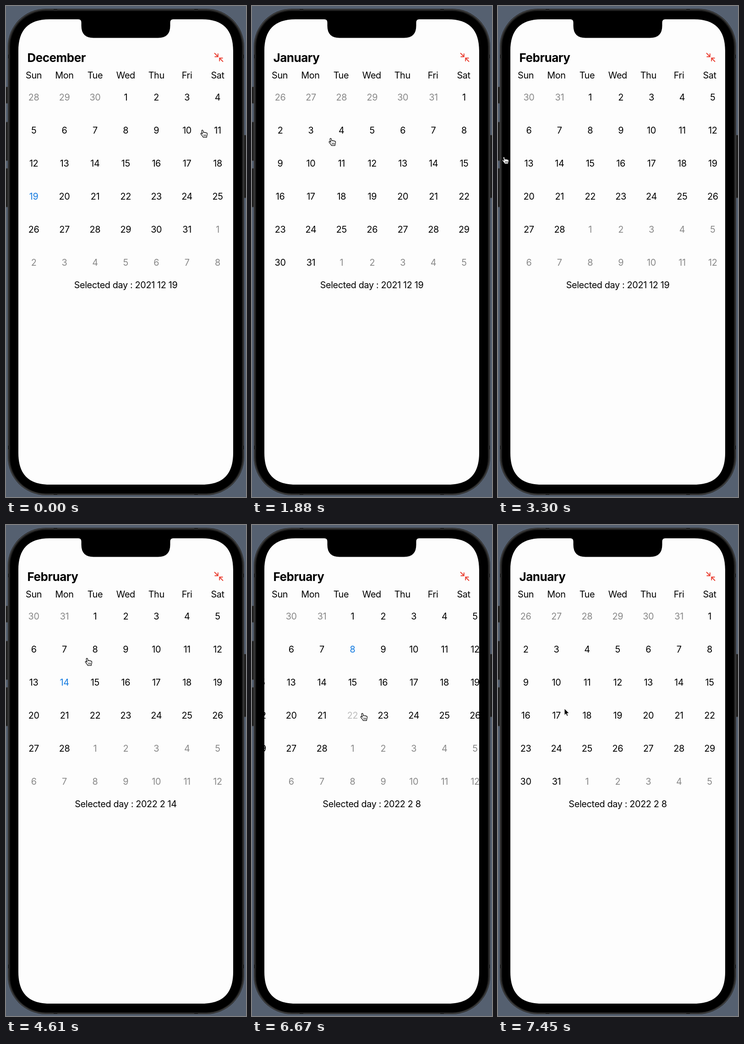
An HTML page for the animation above (7.51 s loop, 524x1070 px).

```html
<!DOCTYPE html>
<html lang="en">
<head>
<meta charset="utf-8">
<title>Calendar</title>
<style>
html, body { margin: 0; width: 100%; height: 100%; overflow: hidden; background: #556070; }
svg { display: block; width: 524px; height: 1070px; font-family: Inter, sans-serif; }
.body { font-size: 19.8px; letter-spacing: -0.35px; text-anchor: middle; }
.title { font-size: 26px; font-weight: 700; letter-spacing: -0.5px; }
</style>
</head>
<body>
<svg id="stage" viewBox="0 0 524 1070">
  <defs>
    <clipPath id="view"><rect x="27" y="170" width="469" height="420"/></clipPath>
  </defs>
  <rect width="524" height="1070" fill="#556070"/>
  <g fill="#1d1d1d" stroke="#3a3a3a">
    <path d="M-2 176.5H3.5V212H-2ZM-2 253H3.5V337H-2ZM-2 354H3.5V438H-2ZM526 281.500H520V418H526Z"/>
  </g>
  <rect x="4" y="6" width="516" height="1060" rx="83" fill="#1c1c1c"/>
  <rect x="5.500" y="7.500" width="513" height="1057" rx="81.500" fill="none" stroke="#464646" stroke-width="1.500"/>
  <path d="M104 6h8v5h-8zM411 6h8v5h-8zM104 1061h8v5h-8zM411 1061h8v5h-8zM4 106h5v8h-5zM515 106h5v8h-5zM4 958h5v8h-5zM515 958h5v8h-5z" fill="#222"/>
  <rect x="9" y="11" width="506" height="1051" rx="78"/>
  <path fill="#fdfdfd" d="M95 29H158Q164.500 29 164.500 36V43Q164.500 69.500 191 69.500H332Q358.500 69.500 358.500 43V36Q358.500 29 365 29H428C474 29 496 52 496 98V974C496 1020 474 1043 428 1043H95C49 1043 27 1020 27 974V98C27 52 49 29 95 29Z"/>
  <text id="month" class="title" x="46.500" y="121.500"></text>
  <path d="M455 102.500L462.500 110M462.800 103.500V110.500H455.500M474 121.500L466.500 114M466.200 120.500V113.500H473.500" fill="none" stroke="#ea3f32" stroke-width="1.900"/>
  <g id="week" class="body"></g>
  <g clip-path="url(#view)"><g id="pages" class="body"></g></g>
  <text id="chosen" class="body" x="261.500" y="615"></text>
  <g id="hand" stroke="#000" stroke-linejoin="round" stroke-linecap="round">
    <path fill="#fff" stroke-width="1.100" d="M-4.400 -6q0-1.600 1.300-1.800q1.300 0 1.600 1.600l.7 3.600q.4-1 1.400-1q1.200 0 1.500 1.100q.4-.7 1.300-.6q1.100.1 1.300 1.200q.4-.4 1.100-.2q1 .3 1 1.600q.1 2.500-.9 4.600l-.3 2.400h-7q-.4-1.600-1.800-2.900l-2.600-3.200q-.9-1.200 0-2q1-.7 2.300.8l.7.8Z"/>
    <path fill="none" stroke-width=".8" d="M0 1.200v3M2 1.200v3M4 1.200v3"/>
  </g>
  <path id="arrow" d="M0 0V14.500L3.300 11.400L5.600 16.500L8 15.500L5.800 10.500H10.300Z" stroke="#fff" stroke-width="1"/>
</svg>
<script>
const LOOP = 7510, PAGE = 468, COL = 66.9, ROW = 72, LEFT = 60.6;
const NS = "http://www.w3.org/2000/svg";
const el = id => document.getElementById(id);
const clamp = v => Math.max(0, Math.min(1, v));
const smooth = p => p * p * (3 - 2 * p);

// Cursor stops: time, x, y, optional power for an accelerating drag
const stops = [
  [0, 432, 279], [30, 432, 279], [450, 435, 272], [800, 435, 270], [1000, 435, 270],
  [1480, 100, 282, 2.42], [1880, 175, 297], [2480, 415, 294], [2560, 415, 294],
  [3100, 16, 337, 2], [3330, 16, 337], [4030, 134, 350], [4340, 134, 350],
  [4600, 180, 299], [5200, 180, 299], [6350, 209, 418], [6450, 209, 418],
  [6900, 505, 426, 3], [7200, 505, 426], [7450, 145, 400], [LOOP, 145, 400]
];
// Page swipes: press time, release time, start x, direction, settling time constant
const swipes = [
  { from: 1000, to: 1480, x: 435, dir: 1, tau: 80 },
  { from: 2560, to: 3100, x: 415, dir: 1, tau: 82 },
  { from: 6450, to: 6900, x: 209, dir: -1, tau: 80 }
];
const picks = [[0, 2021, 12, 19], [4330, 2022, 2, 14], [5080, 2022, 2, 8]];
// Pressed cells: page, cell, start, end of hold, end of fade
const presses = [
  [0, 13, 1000, 1220, 1470], [1, 12, 2560, 2780, 3030], [2, 15, 4200, 4330, 4450],
  [2, 9, 4960, 5080, 5200], [2, 23, 6450, 6670, 6920]
];
const months = [
  { name: "December", year: 2021, num: 12 },
  { name: "January", year: 2022, num: 1 },
  { name: "February", year: 2022, num: 2 }
];

function add(parent, tag, attrs, text) {
  const node = document.createElementNS(NS, tag);
  for (const key in attrs) node.setAttribute(key, attrs[key]);
  if (text !== undefined) node.textContent = text;
  parent.append(node);
  return node;
}

"Sun Mon Tue Wed Thu Fri Sat".split(" ").forEach((day, i) =>
  add(el("week"), "text", { x: LEFT + i * COL, y: 158 }, day));

const pages = months.map(({ year, num }, page) => {
  const group = add(el("pages"), "g", { transform: `translate(${page * PAGE})` });
  const lead = new Date(Date.UTC(year, num - 1, 1)).getUTCDay();
  return Array.from({ length: 42 }, (_, i) => {
    const date = new Date(Date.UTC(year, num - 1, 1 - lead + i));
    const day = date.getUTCDate(), own = date.getUTCMonth() === num - 1;
    const node = add(group, "text", { x: LEFT + i % 7 * COL, y: 206.3 + Math.floor(i / 7) * ROW }, day);
    return { node, day, own };
  });
});

function cursorAt(t) {
  const i = Math.max(1, stops.findIndex(s => s[0] >= t));
  const [t0, x0, y0] = stops[i - 1], [t1, x1, y1, power] = stops[i];
  const p = clamp((t - t0) / (t1 - t0)), e = power ? p ** power : smooth(p);
  return [x0 + (x1 - x0) * e, y0 + (y1 - y0) * e];
}

function scrollAt(t) {
  let pos = 0;
  for (const { from, to, x, dir, tau } of swipes) {
    if (t < from) break;
    // The page follows once the pointer has moved ten pixels
    const drag = Math.max(0, (x - cursorAt(Math.min(t, to))[0]) * dir - 10);
    let rest = PAGE - drag;
    if (t > to) rest *= Math.exp((to - t) / tau);
    if (rest < 0.4) rest = 0;
    pos += dir * (PAGE - rest);
  }
  return pos;
}

function draw(t) {
  const scroll = scrollAt(t), [x, y] = cursorAt(t);
  const [, year, num, day] = picks.filter(p => p[0] <= t).pop();
  el("pages").setAttribute("transform", `translate(${-scroll.toFixed(2)})`);
  el("month").textContent = months[Math.round(scroll / PAGE)].name;
  el("chosen").textContent = `Selected day : ${year} ${num} ${day}`;
  pages.forEach((cells, i) => cells.forEach(c => {
    const on = c.own && c.day === day && months[i].num === num;
    c.node.setAttribute("fill", on ? "#147be0" : c.own ? "#000" : "#888");
    c.node.setAttribute("opacity", 1);
  }));
  for (const [page, cell, start, hold, end] of presses) {
    if (t < start || t > end) continue;
    const fade = 0.25 + 0.75 * clamp((t - hold) / (end - hold));
    pages[page][cell].node.setAttribute("opacity", fade);
  }
  const pointing = t < 7210;
  el("hand").setAttribute("transform", `translate(${x} ${y}) scale(1.1)`);
  el("arrow").setAttribute("transform", `translate(${x} ${y})`);
  el("hand").setAttribute("visibility", pointing ? "visible" : "hidden");
  el("arrow").setAttribute("visibility", pointing ? "hidden" : "visible");
}

const begin = performance.now();
function tick() {
  draw((performance.now() - begin) % LOOP);
  requestAnimationFrame(tick);
}
draw(0);
requestAnimationFrame(tick);
</script>
</body>
</html>
```
